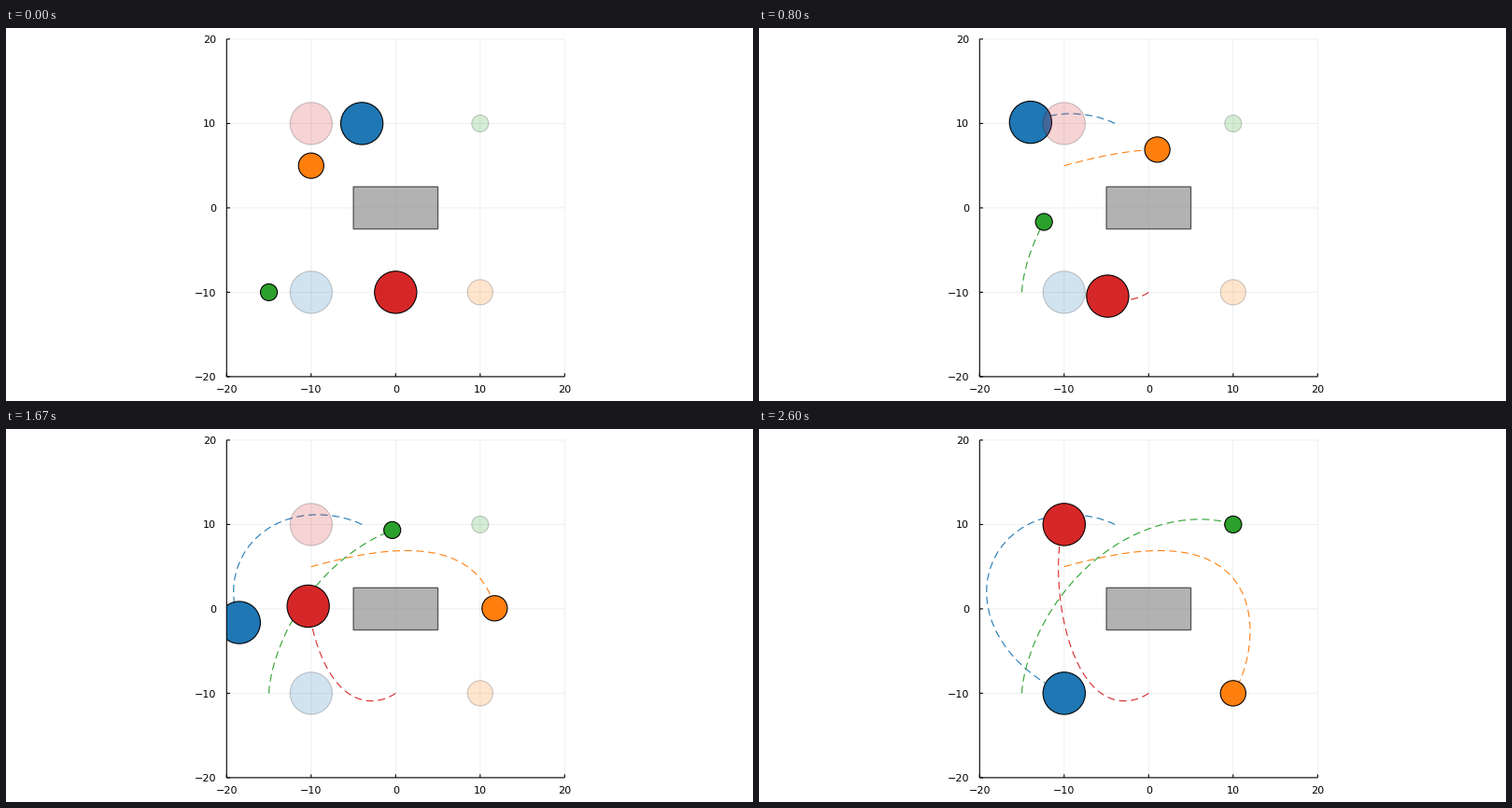
A matplotlib script that plays this animation: 800x400 px, repeating every 2670 ms.

```python
import numpy as np
import matplotlib.pyplot as plt
from matplotlib.animation import FuncAnimation
from matplotlib.patches import Circle, Rectangle

W, H, DPI = 800, 400, 100
PX = 72 / DPI                      # one pixel in points
LINE = 1.1 * PX
DASH = (0, (8 / 1.1, 4.7 / 1.1))   # in line widths
LEFT, BOTTOM, SIDE = 236.3, 373.9, 362
LOOP, TICK, STEPS = 2670, 10, 40
LIM = 20
TICKS = range(-LIM, LIM + 1, 10)

# Colour, radius, start, goal, and the sideways bend of x and y as
# polynomials in time, highest power first.
DISCS = [
    ("#1f77b4", 2.5, (-4, 10), (-10, -10), (-55, 40, -197), (127, -287, 179)),
    ("#ff7f0e", 1.5, (-10, 5), (10, -10), (143.5,), (-130, 94, 100)),
    ("#2ca02c", 1.0, (-15, -10), (10, 10), (28, -75.5), (43, 71)),
    ("#d62728", 2.5, (0, -10), (-10, 10), (-15, -52.5), (120, 0, -121)),
]


def glide(start, goal, bend):
    """Ease from rest to rest, with a bend that fades out at both ends."""
    u = np.linspace(0, 1, STEPS)
    ease = u * u * (3 - 2 * u)
    return start + (goal - start) * ease + (u * (1 - u)) ** 2 * np.polyval(bend, u)


def label(x, y, value, align):
    fig.text(x / W, 1 - y / H, str(value).replace("-", "\u2212"),
             family="DejaVu Sans", size=8, ha=align, va="baseline")


def rules(at, end, **style):
    """Lines from both axes up to the given end, at each value."""
    for draw in (ax.vlines, ax.hlines):
        draw(at, -LIM, end, color="black", clip_on=False, **style)


def draw_axes():
    rules(TICKS, LIM, lw=PX, alpha=0.065, zorder=1)
    rules(TICKS, -LIM + 0.4, lw=LINE, zorder=2)
    rules([-LIM], LIM, lw=LINE, zorder=50)
    for value in TICKS:
        offset = (value + LIM) * SIDE / (2 * LIM)
        label(LEFT + offset, 391, value, "center")
        label(225.3, BOTTOM - offset + 4.1, value, "right")
    ax.set(xlim=(-LIM, LIM), ylim=(-LIM, LIM))
    ax.axis("off")


def add_disc(center, radius, color, alpha, zorder):
    return ax.add_patch(Circle(center, radius, fc=color, ec="black",
                               lw=LINE, alpha=alpha, zorder=zorder))


plt.rcParams["path.snap"] = False
fig = plt.figure(figsize=(W / DPI, H / DPI), dpi=DPI, facecolor="white")
ax = fig.add_axes([LEFT / W, 1 - BOTTOM / H, SIDE / W, SIDE / H])
draw_axes()
ax.add_patch(Rectangle((-5, -2.5), 10, 5, fc="gray", ec="black",
                       lw=1.3 * PX, alpha=0.6, zorder=3))

movers = []
for n, (color, radius, start, goal, *bends) in enumerate(DISCS):
    z = 4 + 3 * n
    path = np.column_stack([glide(*axis) for axis in zip(start, goal, bends)])
    trail, = ax.plot([], [], color=color, lw=LINE, ls=DASH,
                     dash_capstyle="butt", zorder=z)
    disc = add_disc(start, radius, color, 1, z + 1)
    add_disc(goal, radius, color, 0.2, z + 2)
    movers.append((path, trail, disc))


def update(frame):
    step = int((frame * TICK + 5) * 3 / 200)   # 15 steps per second
    for path, trail, disc in movers:
        trail.set_data(*path[:step + 1].T)
        disc.center = path[step]
    return [artist for mover in movers for artist in mover[1:]]


anim = FuncAnimation(fig, update, frames=LOOP // TICK, interval=TICK,
                     repeat=True, repeat_delay=0, blit=False)
plt.show()
```
